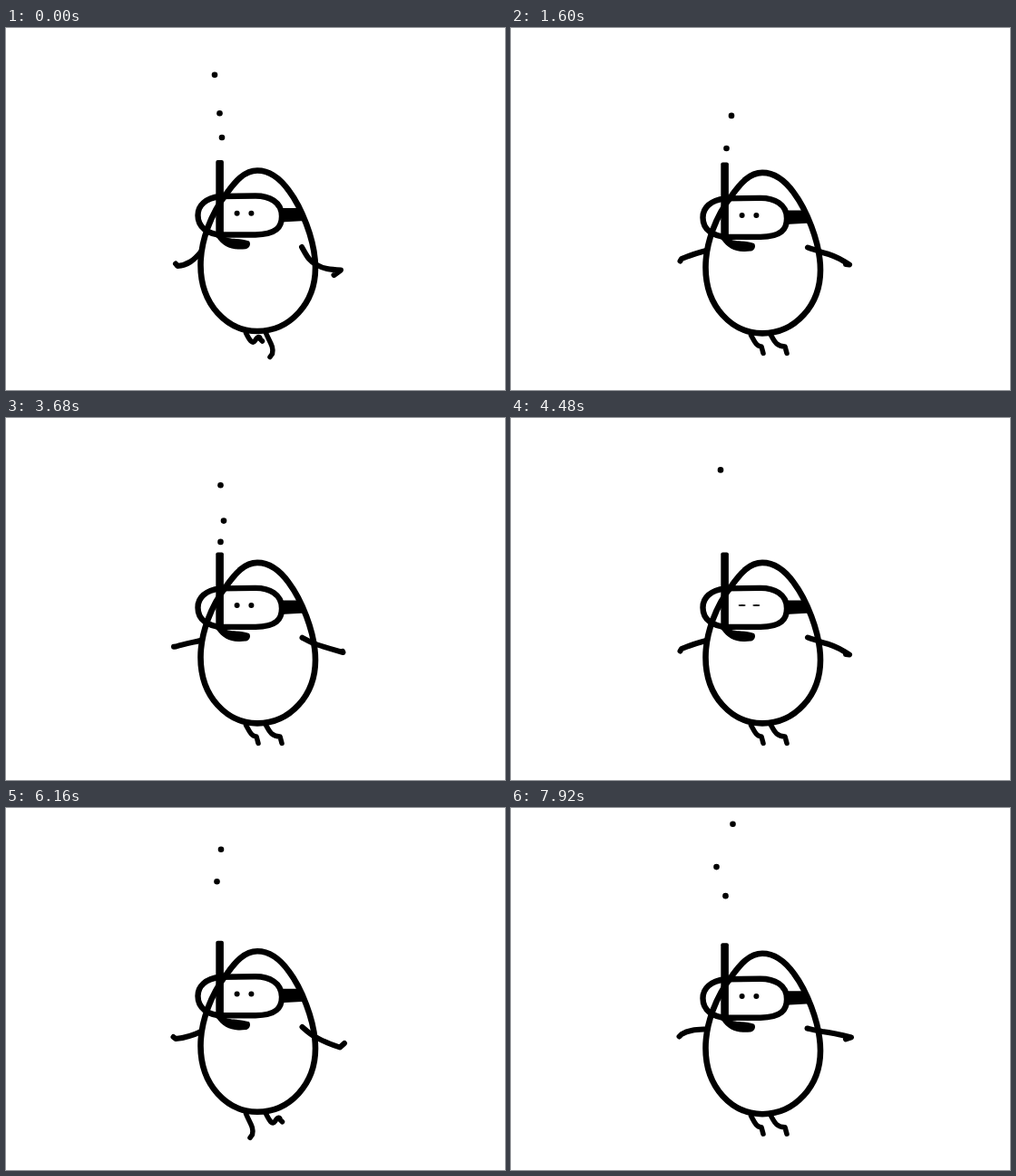
An HTML page for the animation above (8000 ms loop, 550 by 400 pixels).

```html
<!DOCTYPE html>
<html lang="en">
<head>
<meta charset="utf-8">
<title>Snorkelling egg</title>
<style>
  html, body { margin: 0; width: 100%; height: 100%; overflow: hidden; background: #fff; }
  svg { display: block; width: 550px; height: 400px; }
  .line { fill: none; stroke: #000; stroke-width: 6; stroke-linecap: round; stroke-linejoin: round; }
</style>
</head>
<body>
<svg viewBox="0 0 550 400">
  <g id="bubbles">
    <circle r="3.3"/><circle r="3.3"/><circle r="3.3"/>
  </g>
  <g id="body">
    <g class="line" style="stroke-width:5.5">
      <path id="legL"/>
      <path id="legR"/>
    </g>
    <path class="line" style="stroke-width:6.6" d="M277 157.5C291 157.5 302 166 312 180C324 196 341 233 341 265C341 304 313 335 277 335C244 335 214.5 306 214.5 262C214.5 235 226 205 243 183C253 169 263 157.5 277 157.5Z"/>
    <path d="M303 199H325L330 213L303 214.500Z"/>
    <path class="line" style="stroke-width:6.4" d="M236 186C220 188 211.500 196 211.500 207C211.500 220 222 228 238 228.500H275C298 228 304 220 304 208C304 192 290 185.500 275 185.500Z"/>
    <ellipse class="eye" cx="254.600" cy="204.700"/>
    <ellipse class="eye" cx="270.400" cy="204.700"/>
    <rect id="tube" x="231.300" y="146" width="8.600" height="86" rx="2"/>
    <path id="mouth"/>
  </g>
  <g class="line">
    <path id="armL"/>
    <path id="armR"/>
  </g>
</svg>
<script>
const STEP = 80, FRAMES = 100;
const $ = id => document.getElementById(id);
const lerp = (a, b, k) => a + (b - a) * k;

// Blends two paths that share the same commands.
function mix(a, b) {
  const nums = b.match(/[\d.]+/g);
  let i = 0;
  return a.replace(/[\d.]+/g, n => lerp(+n, +nums[i++], 0.5));
}

function cycle(a, c, d, f) {
  return [a, mix(a, c), c, d, mix(d, f), f];
}

const armsL = cycle(
  "M215 247C207 257 200 262 189 263L187 260.500",
  "M215 246C207 248 198 251 188 255L186.500 257.500",
  "M215 244.500C205 245 196 245 188 250L185.500 252.500",
  "M215 247C207 251 198 254 187 255L184.500 253"
);
const armsR = cycle(
  "M326 242C331 251 334 258 343 262C350 266 356 267 369 267.500L361.500 273",
  "M327 242.500C333 245 337 245 343 248C352 250 362 254 373 261.500L369 261",
  "M326.500 243.500C333 245 337 246 343 247C352 248 362 250 375 253.500L369 255.500",
  "M326.500 242C332 247 336 251 343 254C350 258 360 262 368 264.500L373 260"
);

const legs = {
  kick: x => `M${x} 337C${x + 4} 345 ${x + 7} 350 ${x + 10} 345.500C${x + 13} 340 ${x + 16} 341 ${x + 15.500} 343.500L${x + 18} 346`,
  straight: x => `M${x} 337C${x + 4} 347 ${x + 9} 352 ${x + 7} 360L${x + 4.500} 363.500`,
  hang: (x, reach) => `M${x} 337C${x + 4} 344 ${x + 6} 349.500 ${x + reach - 2} 349.500L${x + reach} 357`
};

const mouths = {
  rest: "M232 228L240 230C246 234 257 232 268 235.500C270.500 239 268 244 264 244.200C250 246 239 242 232 231Z",
  blow: "M232 228L240 230C246 234 257 233 267 235.500C267.500 240 267.500 246 264.500 249.500C262.500 249 264 246 263 245C251 245 240 241 232 231Z"
};

// Rise per frame and sideways drift as [frame, x] points.
const bubbles = [
  { y: 119.5, at: 18, rise: 11.3, from: 16, to: 27,
    drift: [[16, 236], [18, 237], [20, 243], [24, 230], [27, 244.5]] },
  { y: 133, at: 20, rise: 9.7, from: 19, to: 30,
    drift: [[19, 236.5], [20, 237.5], [22, 240], [24, 235.5], [27, 226.5], [29, 237], [30, 240]] },
  { y: 121, at: 24, rise: 7.95, from: 21, to: 35,
    drift: [[21, 236], [24, 238], [27, 236.5], [29, 232.5], [32, 231], [35, 236]] }
];

function driftAt(points, f) {
  const i = Math.max(1, points.findIndex(p => p[0] >= f));
  const [a, b] = [points[i - 1], points[i]];
  const k = (f - a[0]) / (b[0] - a[0]);
  return lerp(a[1], b[1], (1 - Math.cos(Math.PI * k)) / 2);
}

const dots = document.querySelectorAll("#bubbles circle");
const eyes = document.querySelectorAll(".eye");

function drawLegs(phase) {
  const near = p => Math.min((phase - p + 12) % 12, (p - phase + 12) % 12) <= 1;
  const pose = near(0) ? ["kick", "straight"] : near(6) ? ["straight", "kick"] : ["hang", "hang"];
  $("legL").setAttribute("d", legs[pose[0]](264.5, 13.5));
  $("legR").setAttribute("d", legs[pose[1]](286.5, 17.5));
}

function drawBubbles(phase) {
  bubbles.forEach((b, i) => {
    const f = phase < 12 ? phase + 24 : phase;
    const shown = f >= b.from && f <= b.to;
    dots[i].style.display = shown ? "" : "none";
    if (!shown) return;
    dots[i].setAttribute("cx", driftAt(b.drift, f));
    dots[i].setAttribute("cy", b.y - b.rise * (f - b.at));
  });
}

function drawFace(phase) {
  const shut = phase === 8 ? 1 : Math.abs(phase - 8) === 1 ? 0.5 : 0;
  eyes.forEach(e => {
    e.setAttribute("rx", lerp(3, 4, shut));
    e.setAttribute("ry", lerp(3, 1, shut));
  });
  const blow = phase >= 16 && phase <= 18;
  $("tube").setAttribute("x", blow ? 232.2 : 231.3);
  $("mouth").setAttribute("d", blow ? mouths.blow : mouths.rest);
}

function draw(time) {
  const n = Math.floor(time / STEP) % FRAMES;
  const beat = n % 6;
  const bob = 1.6 * (1 - Math.cos(beat * Math.PI / 3));
  $("body").setAttribute("transform", `translate(0 ${bob})`);
  $("armL").setAttribute("d", armsL[beat]);
  $("armR").setAttribute("d", armsR[beat]);
  drawLegs(n % 12);
  drawFace(n % 24);
  drawBubbles(n % 24);
}

const start = performance.now();
function tick() {
  draw(performance.now() - start);
  requestAnimationFrame(tick);
}
tick();
</script>
</body>
</html>
```
